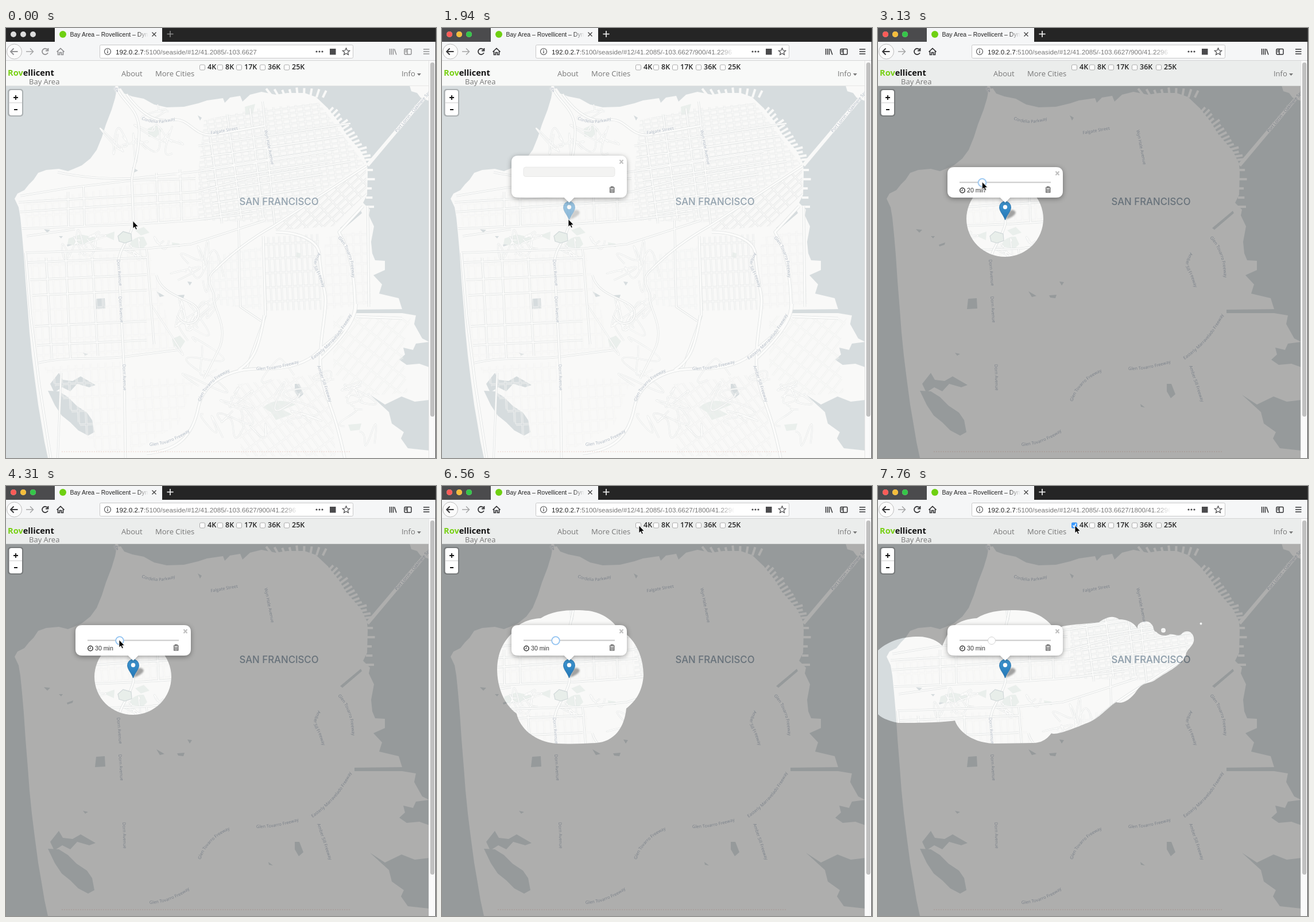
Recreate the animation shown at these times as an HTML page. Size 749 by 748 pixels, loop 8000 ms.

```html
<!DOCTYPE html>
<html lang="en">
<head>
<meta charset="utf-8">
<title>Travel time map</title>
<style>
html, body { margin: 0; width: 100%; height: 100%; overflow: hidden; background: #d6dcde; }
svg { display: block; width: 749px; height: 748px; }
text { font-family: "Open Sans", "Noto Sans", sans-serif; white-space: pre; }
.ui { font-family: "Liberation Sans", Arial, sans-serif; }
.label { font-size: 7.5px; fill: #abb5c1; stroke: #f9f9f8; stroke-width: 1.6px; paint-order: stroke; }
.city { font: 500 16.8px Inter, "Open Sans", sans-serif; fill: #93a2ae; }
.nav { font-size: 13px; fill: #777; }
.pick { font-size: 12.5px; font-weight: 600; fill: #222; }
.water { fill: #d6dcde; }
.land { fill: #f9f9f8; }
.park { fill: #eaefec; }
.icon { fill: none; stroke: currentColor; stroke-width: 1.5px; }
.solid { fill: currentColor; stroke: none; }
.focus { animation: focus 8s step-end infinite; }
.bar { animation: bar 8s step-end infinite; }
.cursor { animation: cursor 8s step-end infinite; }
.knob { animation: knob 8s step-end infinite; }
.pin { animation: pin 8s step-end infinite; }
@keyframes focus { 0% { color: #929294; } 9.375% { color: #353537; } }
@keyframes bar { 0% { fill: #f8f9f8; } 26.125% { fill: #ebedec; } }
@keyframes pin { 0% { opacity: 0; } 22.375% { opacity: .5; } 26.125% { opacity: 1; } }
@keyframes knob {
  0% { transform: translateX(174px); }
  35.375% { transform: translateX(174px); animation-timing-function: steps(6); }
  46.5% { transform: translateX(196.4px); }
  53.875%, 100% { transform: translateX(198px); }
}
@keyframes cursor {
  0% { transform: translate(221px, 336px); animation-timing-function: steps(3); }
  5.625% { transform: translate(218px, 334px); }
  16.875% { transform: translate(220px, 333px); }
  26.125% { transform: translate(220px, 333px); animation-timing-function: steps(5); }
  35.375% { transform: translate(174px, 268px); animation-timing-function: steps(6); }
  46.5% { transform: translate(196px, 268px); }
  53.875% { transform: translate(197px, 268px); }
  65.125% { transform: translate(197px, 262px); }
  68.875% { transform: translate(210px, 254px); animation-timing-function: steps(6); }
  80.125% { transform: translate(342px, 70px); }
  82%, 100% { transform: translate(343px, 69px); }
}
</style>
</head>
<body>
<svg viewBox="0 0 749 748" xmlns="http://www.w3.org/2000/svg">
<defs id="defs">
  <linearGradient id="fadeUrl"><stop offset="0" stop-color="#fff" stop-opacity="0"/><stop offset="1" stop-color="#fff"/></linearGradient>
  <linearGradient id="fadeTab"><stop offset="0" stop-color="#f5f6f7" stop-opacity="0"/><stop offset="1" stop-color="#f5f6f7"/></linearGradient>
  <linearGradient id="pinBlue" x2="0" y2="1"><stop offset="0" stop-color="#3f97d3"/><stop offset="1" stop-color="#2376b4"/></linearGradient>
  <filter id="shade" x="-20%" y="-30%" width="140%" height="170%"><feDropShadow dx="0" dy="2" stdDeviation="4" flood-opacity=".38"/></filter>
  <filter id="blur"><feGaussianBlur stdDeviation="1.6"/></filter>
</defs>

<rect class="water" width="749" height="748"/>
<g id="land" class="land">
  <path d="M73 748L67 720 62 690 56 655 50 610 45 570 41 530 38 490 34 440 31 395 28 360 25 330 22 312 15 297 20 288 32 282 40 272 48 264 56 252 70 247 92 245 108 249 118 245 132 239 147 227 158 212 167 190 174 168 184 142 190 122 193 106 200 105 206 114 220 119 240 123 258 133 280 138 310 137 335 131 350 126 378 122 381 130 390 121 408 118 412 128 425 116 445 111 470 116 490 113 520 113 540 120 561 140V748Z"/>
  <path d="M560 139L568 149 580 164 592 184 605 199 618 214 629 236 630 252 629 290 622 304 634 316 632 326 641 345 636 372 638 392 643 404 660 405 660 421 640 430 655 446 650 462 684 470 690 489 607 490V496H690L714 500 711 515 725 540 737 546 714 549 709 560 692 556 695 568 685 577 698 586 720 584 737 590V647L712 650 689 641 660 655 634 638 667 668 672 688 693 703 688 714 700 731 737 735V748H550V139Z"/>
  <path d="M703 100L706 110 716 113 722 121 737 127V100Z"/>
  <path d="M627 237L738 106 742 110 632 241Z"/>
  <path d="M190 100H195L197 112H192Z"/>
</g>
<g class="water">
  <path d="M77 619L92 600 99 612 116 614 130 606 156 621 145 625 124 619 112 632 98 625 84 634Z"/>
  <path d="M73 631L92 632 108 642 123 657 141 669 150 682 154 703 143 709 126 700 112 686 97 674 85 656Z"/>
  <path d="M157 471L172 470 173 488 155 489ZM503 619L511 619 518 637 510 644 503 632Z"/>
  <path d="M262 458L276 466 268 468ZM298 465L311 464 309 470 300 469ZM316 441L324 442 320 448ZM134 565L143 567 138 570ZM334 152L341 156 338 161ZM220 242L230 248 222 252ZM457 654L465 660 458 659Z"/>
  <path d="M582 348L618 318 620 322 586 351ZM106 377L117 373 116 377 107 380ZM92 362L99 362 96 366ZM66 350L77 351 72 356Z"/>
</g>

<g id="roadsBase" data-on="0 2090"><g id="roads">
  <g class="park">
    <path d="M247 175L262 168 273 176 262 190 248 189ZM416 137L434 132 430 149 417 151ZM109 366L130 359 158 365 151 373 120 378 107 376ZM170 361L189 354 188 369ZM214 380Q220 362 240 363L246 376 238 384ZM225 352L240 346 250 356 235 361ZM289 373L302 375 303 381 290 379ZM289 541L303 535 312 545 303 559 292 554Z"/>
    <path d="M448 660Q470 640 505 655L482 664 498 672 470 682 462 669ZM596 690L619 688 616 699 600 701ZM506 390L513 392 512 400 505 399Z"/>
  </g>
  <g id="blocks"></g>
  <g id="lanes" fill="none" stroke-linejoin="round"></g>
  <path d="M195 362L204 354 218 358 219 370 207 374 197 371Z" fill="#e8eeea" stroke="#d3dadb" stroke-width="1.3"/>
</g></g>

<path d="M97 737H600" stroke="#ecd3cd" stroke-dasharray="2 2"/>
<g id="labels"></g>
<text class="city" x="475.5" y="307.5" text-anchor="middle">SAN FRANCISCO</text>
<g id="reach"></g>

<!-- page header -->
<rect class="bar" y="57" width="737" height="44"/>
<path d="M0 100.5H737" stroke="#000" stroke-opacity=".07"/>
<text x="3" y="83" font-size="14.6" font-weight="700" fill="#111"><tspan fill="#78d015">Rov</tspan>ellicent</text>
<text class="nav" x="40" y="97.5">Bay Area</text>
<text class="nav" x="201" y="84">About</text>
<text class="nav" x="260" y="84">More Cities</text>
<text class="nav" x="689" y="84">Info</text>
<path d="M716 79H723L719.5 83Z" fill="#777"/>
<g id="picks"></g>
<g data-on="7460 8000">
  <rect x="337" y="63.5" width="10" height="10" rx="2" fill="#3b99fc"/>
  <path d="M339.5 68.5L341.5 71 345 65.5" fill="none" stroke="#fff" stroke-width="1.5"/>
</g>

<!-- zoom buttons -->
<rect x="3" y="106" width="27" height="48" rx="5" fill="#000" fill-opacity=".2"/>
<rect x="5.5" y="108" width="22.5" height="44" rx="4" fill="#fff"/>
<path d="M5.5 130H28" stroke="#ccc"/>
<path d="M13 121H21M17 117V125M14 142H20" stroke="#111" stroke-width="1.8"/>

<!-- marker and popup -->
<g class="pin">
  <path d="M222 333L229 318Q236 314 240 321 237 329 222 333Z" fill="#000" opacity=".35" filter="url(#blur)"/>
  <path d="M221.5 334C219 326 211.5 319 211.5 312A10 10.5 0 0 1 231.5 312C231.5 319 224 326 221.5 334Z" fill="url(#pinBlue)" stroke="#2b72a8" stroke-width=".8"/>
  <circle cx="221.5" cy="311.5" r="3.7" fill="#fff"/>
</g>
<g data-on="1790 2090">
  <path d="M133 222H310Q322 222 322 234V283Q322 295 310 295H230L221.5 303.5 213 295H133Q121 295 121 283V234Q121 222 133 222Z" fill="#fff" filter="url(#shade)"/>
  <rect x="142" y="242" width="159" height="16.5" rx="4" fill="#f3f3f2" stroke="#e9e9e8"/>
  <path d="M309.5 229.5L315.5 236M315.5 229.5L309.5 236" stroke="#c0c0c0" stroke-width="2"/>
</g>
<g data-on="2090 8000">
  <path d="M133 242H310Q322 242 322 254V283Q322 295 310 295H230L221.5 303.5 213 295H133Q121 295 121 283V254Q121 242 133 242Z" fill="#fff" filter="url(#shade)"/>
  <path d="M309.5 249.5L315.5 256M315.5 249.5L309.5 256" stroke="#c0c0c0" stroke-width="2"/>
  <path d="M142 268.5H301" stroke="#c9c9c9" stroke-width="2"/>
  <g class="knob"><circle cy="269" r="6.5" fill="#fff" stroke="#d2d2d2"/></g>
  <g data-on="2980 7460"><g class="knob"><circle cy="269" r="6.8" fill="#fff" stroke="#92c3f1" stroke-width="1.8"/></g></g>
  <g fill="none" stroke="#333">
    <circle cx="147" cy="282.5" r="4.2" stroke-width="1.5"/>
    <path d="M147 280V283H144.8"/>
  </g>
  <g id="minutes"></g>
</g>
<g data-on="1790 8000" fill="none" stroke="#444" stroke-width="1.2">
  <path d="M291.5 278H301M294.5 277.5V276H298V277.5M292.8 279V286H299.7V279M295 280V285M297.5 280V285"/>
</g>

<!-- scrollbar -->
<rect x="737" y="57" width="12" height="691" fill="#fafafa"/>
<path d="M736.5 57V748" stroke="#e5e5e5"/>
<rect x="739" y="60" width="7.5" height="616" rx="3.7" fill="#c1c1c1"/>

<!-- browser frame -->
<rect width="749" height="24" fill="#252525"/>
<rect data-on="750 8000" width="85" height="24" fill="#4b4b4d"/>
<rect y="24" width="749" height="33" fill="#f5f6f7"/>
<rect x="85" width="187" height="25" fill="#f5f6f7"/>
<g fill="#dcdcdc"><circle cx="13" cy="11" r="5"/><circle cx="30" cy="11" r="5"/><circle cx="47" cy="11" r="5"/></g>
<g data-on="750 8000"><circle cx="13" cy="11" r="5" fill="#fc5b57"/><circle cx="30" cy="11" r="5" fill="#f5bd3b"/><circle cx="47" cy="11" r="5" fill="#35c649"/></g>
<circle cx="99" cy="11" r="6" fill="#6fd012"/>
<text class="ui" x="111.5" y="15" font-size="10.5" fill="#222">Bay Area – Rovellicent – Dynam</text>
<rect x="228" y="2" width="20" height="19" fill="url(#fadeTab)"/>
<rect x="248" y="2" width="24" height="19" fill="#f5f6f7"/>
<path d="M254.5 7.5L261.5 14.5M261.5 7.5L254.5 14.5" stroke="#444" stroke-width="1.4"/>
<path d="M280.5 10.5H291.5M286 5V16" stroke="#8c8c8c" stroke-width="1.5"/>
<path data-on="750 8000" d="M280.5 10.5H291.5M286 5V16" stroke="#eee" stroke-width="1.5"/>
<path d="M0 56.5H749" stroke="#d5d5d6"/>
<rect x="163.5" y="29.5" width="441" height="23" rx="2" fill="#fff" stroke="#c8c8c9"/>
<g class="focus">
  <circle cx="14.5" cy="41" r="13" fill="#fbfbfb" stroke="#bdbdbd"/>
  <g class="icon">
    <path d="M20.5 41H8.5M13.5 35.5L8 41 13.5 46.5" stroke-width="1.8"/>
    <path d="M35 41H47M42 35.5L47.5 41 42 46.5" stroke="#a5a5a6"/>
    <path d="M72.5 38A5.2 5.2 0 1 0 73 43M73.5 35V39.5H69" stroke-width="1.8"/>
    <path d="M88.5 41.5L95 35.5 101.5 41.5M90.5 40.5V46.5H93.5V42.5H96.5V46.5H99.5V40.5" stroke-width="1.7"/>
    <path d="M668.5 36V46.5M671.5 36V46.5M674.5 36V46.5M676.5 36.5L680 46.5"/>
    <rect x="694" y="36.5" width="12" height="9.5" rx="1.5"/>
    <path d="M699 36.5V46M695.5 39H698M695.5 41.5H698M727 37H737.5M727 41H737.5M727 45H737.5"/>
  </g>
</g>
<g color="#4a4a4c">
  <g class="icon">
    <circle cx="177" cy="41" r="5.5" stroke-width="1.1"/>
    <path d="M177 40V44M177 37.5V39" stroke-width="1.3"/>
    <path d="M592.5 35L594.3 39 598.7 39.4 595.4 42.3 596.4 46.6 592.5 44.3 588.6 46.6 589.6 42.3 586.3 39.4 590.7 39Z" stroke-width="1.2"/>
  </g>
  <g class="solid"><circle cx="541" cy="41" r="1.6"/><circle cx="546" cy="41" r="1.6"/><circle cx="551" cy="41" r="1.6"/><rect x="564" y="36" width="10.5" height="10.5"/></g>
</g>
<g id="urls"></g>
<rect x="482" y="31" width="28" height="20" fill="url(#fadeUrl)"/>
<rect x="509" y="31" width="28" height="20" fill="#fff"/>
<path d="M748.5 0V748" stroke="#3a3a3a"/>

<g class="cursor"><path d="M0 -.5V13L3.100 10.200 5 14.800 7.300 13.800 5.400 9.400H9.500Z" fill="#000" stroke="#fff" stroke-width=".9"/></g>
</svg>

<script>
const $ = id => document.getElementById(id);
const put = (id, markup) => $(id).insertAdjacentHTML('beforeend', markup);
const range = n => [...Array(n).keys()];
let seed = 11;
const rnd = () => (seed = seed * 16807 % 2147483647) / 2147483647;

// piers along the north, north-east and east shore
const pier = (x, y, length, angle) =>
  `<rect x="${x}" y="${y}" width="${length}" height="4" transform="rotate(${angle} ${x} ${y})"/>`;
put('land',
  range(15).map(i => pier(561 + i * 4.6, 145 + i * 5.9, 11 + rnd() * 8, -48 + i * 3)).join('') +
  range(9).map(i => pier(462 + i * 11, 120, 12 + rnd() * 6, -128 + i * 8)).join('') +
  range(5).map(i => pier(627, 245 + i * 16, 10 + rnd() * 7, 0)).join(''));

// city blocks: outline, angle, block width, block height, line colour
const blocks = [
  ['345,160 440,140 545,130 624,236 470,338 335,335 335,250', -8, 13, 9, '#e8eaea'],
  ['627,242 628,288 570,345 470,352 468,340', -43, 21, 10, '#e4e6e6'],
  ['447,364 545,358 550,490 450,492', -3, 9.5, 25, '#e8eaea'],
  ['555,365 630,350 636,480 555,490', -3, 13, 17, '#f1f1f1'],
  ['30,303 330,255 335,335 35,345', -4, 12, 22, '#f3f3f2'],
  ['40,400 250,390 295,560 52,580', -3, 12, 26, '#f3f3f2'],
  ['345,400 445,380 445,490 355,480', -4, 11, 16, '#f0f1f1'],
  ['570,500 705,505 690,560 700,635 620,640 570,600', 38, 14, 26, '#f0f1f0'],
  ['400,620 560,600 575,745 410,745', -36, 12, 24, '#eff0ef'],
  ['220,610 330,610 300,690 215,740', -4, 14, 20, '#f3f3f2'],
  ['65,590 200,580 200,740 160,740', -3, 13, 24, '#f3f3f2']
];
blocks.forEach(([area, angle, w, h, line], i) => {
  put('defs', `<pattern id="b${i}" width="${w}" height="${h}" patternUnits="userSpaceOnUse" patternTransform="rotate(${angle})">
    <rect x="1" y="1" width="${w - 2.4}" height="${h - 2.4}" fill="none" stroke="${line}" stroke-width=".9"/></pattern>`);
  put('blocks', `<polygon points="${area}" fill="url(#b${i})"/>`);
});

// winding hill roads
const winding = (n, x, y, w, h, step) => range(n).map(() => {
  const bend = () => `${(rnd() - .5) * step | 0} ${(rnd() - .5) * step | 0}`;
  return `M${x + rnd() * w | 0} ${y + rnd() * h | 0}q${bend()} ${bend()}t${bend()}t${bend()}`;
}).join('');
const hills = winding(13, 275, 410, 100, 150, 60) + winding(10, 195, 145, 115, 75, 50) +
  winding(12, 330, 590, 230, 120, 60) + winding(9, 60, 358, 230, 20, 36) + winding(6, 580, 600, 60, 120, 50);

const sunset = [408, 438, 465, 519, 552].map((y, i) => `M${38 + i * 4} ${y}L245 ${y - 9}`).join('');
const uptown = range(7).map(i => `M${335 + i * 5} ${205 + i * 20}L${600 - i * 12} ${166 + i * 22}`).join('');
const streets = sunset + uptown +
  'M90 251C150 264 200 262 218 262L330 250 560 215M25 292L110 278 220 265 330 262M22 303C120 297 250 291 330 285L420 262 600 232' +
  'M24 320L215 307 340 300M28 349L230 341 320 335 430 322M34 391L240 384 322 376 450 335M36 362L120 350M108 285L109 345M135 276L137 345M262 252L266 338M303 246L306 336' +
  'M70 400L80 575M150 398L160 570M104 392L112 575M245 385L258 550M447 128L468 342M385 150L410 330M356 190L376 340M425 140L448 330M405 335L408 485L445 510' +
  'M55 583C110 570 150 578 205 572L300 560M90 748L96 600M262 430C272 470 330 470 335 492S310 524 298 500M365 420C340 440 365 455 362 470S390 520 370 560L345 610';
const main = 'M195 108C205 130 232 140 232 180S220 245 219 265L222 340C215 370 195 385 196 410L206 600 208 748' +
  'M34 391L43 500 58 620 78 748M210 115C235 150 260 165 290 160S325 188 360 186L450 170' +
  'M628 240L465 345C420 370 390 395 365 420M448 362L452 500 420 590M610 502L690 505M630 310L632 485';
const freeways = 'M245 740C300 735 325 710 335 660S400 592 440 593 520 588 545 562 610 520 608 478 605 400 580 355L622 310' +
  'M470 355C510 355 545 370 546 395S552 440 556 465 545 540 548 590 570 650 590 748M548 575C580 545 610 510 610 480M405 595C430 580 440 560 450 500';
const lane = (d, casing, core) =>
  `<path d="${d}" stroke="#e0e3e3" stroke-width="${casing}"/><path d="${d}" stroke="#fcfcfb" stroke-width="${core}"/>`;
put('lanes', lane(hills, 2.6, 1.5) + lane(streets, 3.6, 2.1) + lane(main, 4.4, 2.8) + lane(freeways, 5.2, 3.6));

// street names along curves
const freeway = 'Glen Tovarro Freeway', avenue = 'Dorn Avenue', bend = 'Amber Sill Freeway';
[
  ['Cordelia Parkway', 'M236 159Q268 173 306 155'],
  ['Falgate Street', 'M357 185L425 173'],
  ['Wyn Hale Avenue', 'M450 178L465 252'],
  [avenue, 'M193 403L198 460'], [avenue, 'M196 467L200 524'], [avenue, 'M203 585L205 645'],
  [freeway, 'M250 727Q295 725 332 692'], [freeway, 'M339 650Q352 610 404 592'],
  [freeway, 'M436 595Q480 595 528 576'], [freeway, 'M578 365Q606 395 602 450'],
  [bend, 'M544 390C530 415 538 420 545 432L558 472'], [bend, 'M542 588L570 672'],
  ['Easterly Marravelado Freeway', 'M534 577Q594 535 612 472'],
  ['Port Lorrin – Oakmere Span', 'M681 182L744 107'],
  ['ge', 'M190 104L194 125']
].forEach(([name, d], i) => {
  put('defs', `<path id="l${i}" d="${d}"/>`);
  put('labels', `<text class="label"><textPath href="#l${i}">${name}</textPath></text>`);
});

// reachable areas: the shade covers everything outside them
const top30 = 'C130 240 150 231 172 230C195 214 235 215 255 217C282 221 298 235 308 250';
const areas = [
  ['2090 4760', 'M154 332A67 66 0 0 1 288 332A67 66 0 0 1 154 332Z'],
  ['4760 7610', `M96 318C97 290 106 272 122 256${top30}C335 262 351 295 351 330C349 355 340 372 321 387C318 420 300 445 268 447C240 448 220 449 200 448C160 445 135 420 130 396C108 380 96 350 96 318Z`],
  ['7610 8000', `M0 286C20 268 45 262 70 262C90 262 105 270 112 278L122 256${top30}L322 244C340 240 365 240 385 237C395 230 408 223 420 232C435 232 446 238 452 248C450 236 470 231 476 240C482 245 478 252 485 254C490 260 500 262 508 258C515 256 525 264 530 256C540 248 552 256 550 270C548 280 536 285 536 296C525 315 500 325 482 338C470 345 462 340 450 357C440 372 425 380 415 376C400 385 385 405 365 412C345 420 310 435 302 430C290 447 275 447 268 447L200 448C160 445 140 425 134 408C110 412 60 412 35 412C15 408 5 402 0 397Z` +
    'M493 251a4 4 0 0 0 8 0a4 4 0 0 0 -8 0ZM560.5 239.5a2 2 0 0 0 4 0a2 2 0 0 0 -4 0Z']
];
areas.forEach(([on, d], i) => {
  put('defs', `<clipPath id="a${i}"><path d="${d}"/></clipPath>`);
  put('reach', `<g data-on="${on}"><g clip-path="url(#a${i})"><use href="#roads"/><use href="#labels"/>
      <text class="city" x="475.5" y="307.5" text-anchor="middle">SAN FRANCISCO</text></g>
    <path d="M0 57H737V748H0Z${d}" fill="#000" fill-opacity=".3" fill-rule="evenodd"/></g>`);
});

['4K', '8K', '17K', '36K', '25K'].forEach((name, i) => {
  const x = [337, 368, 401, 442, 484][i];
  put('picks', `<rect x="${x + .5}" y="64" width="9" height="9" rx="2" fill="#fff" stroke="#aaa"/>
    <text class="pick" x="${x + 14}" y="72">${name}</text>`);
});

const dragAt = [2090, 2980, 3130, 3280, 3430, 3580, 3720, 4310, 8000];
[15, 17, 20, 22, 24, 27, 29, 30].forEach((m, i) =>
  put('minutes', `<text class="ui" data-on="${dragAt[i]} ${dragAt[i + 1]}" x="155" y="286" font-size="10.6" fill="#333">${m} min</text>`));

[['0 1790', ''], ['1790 4760', '/900/41.2296'], ['4760 8000', '/1800/41.2296']].forEach(([on, tail]) =>
  put('urls', `<text class="ui" data-on="${on}" x="191" y="45.5" font-size="11.7" fill="#222">192.0.2.7<tspan fill="#777">:5100/seaside/#12/41.2085/-103.6627${tail}</tspan></text>`));

// data-on="from to" becomes a hard-cut visibility animation
const sheet = document.createElement('style');
document.querySelectorAll('[data-on]').forEach((el, i) => {
  const [from, to] = el.dataset.on.split(' ').map(Number);
  const key = (ms, state) => `${ms / 80}%{visibility:${state}}`;
  sheet.textContent += `@keyframes on${i}{${from ? key(0, 'hidden') : ''}${key(from, 'visible')}${to < 8000 ? key(to, 'hidden') : ''}}`;
  el.style.animation = `on${i} 8s step-end infinite`;
});
document.head.append(sheet);
</script>
</body>
</html>
```
